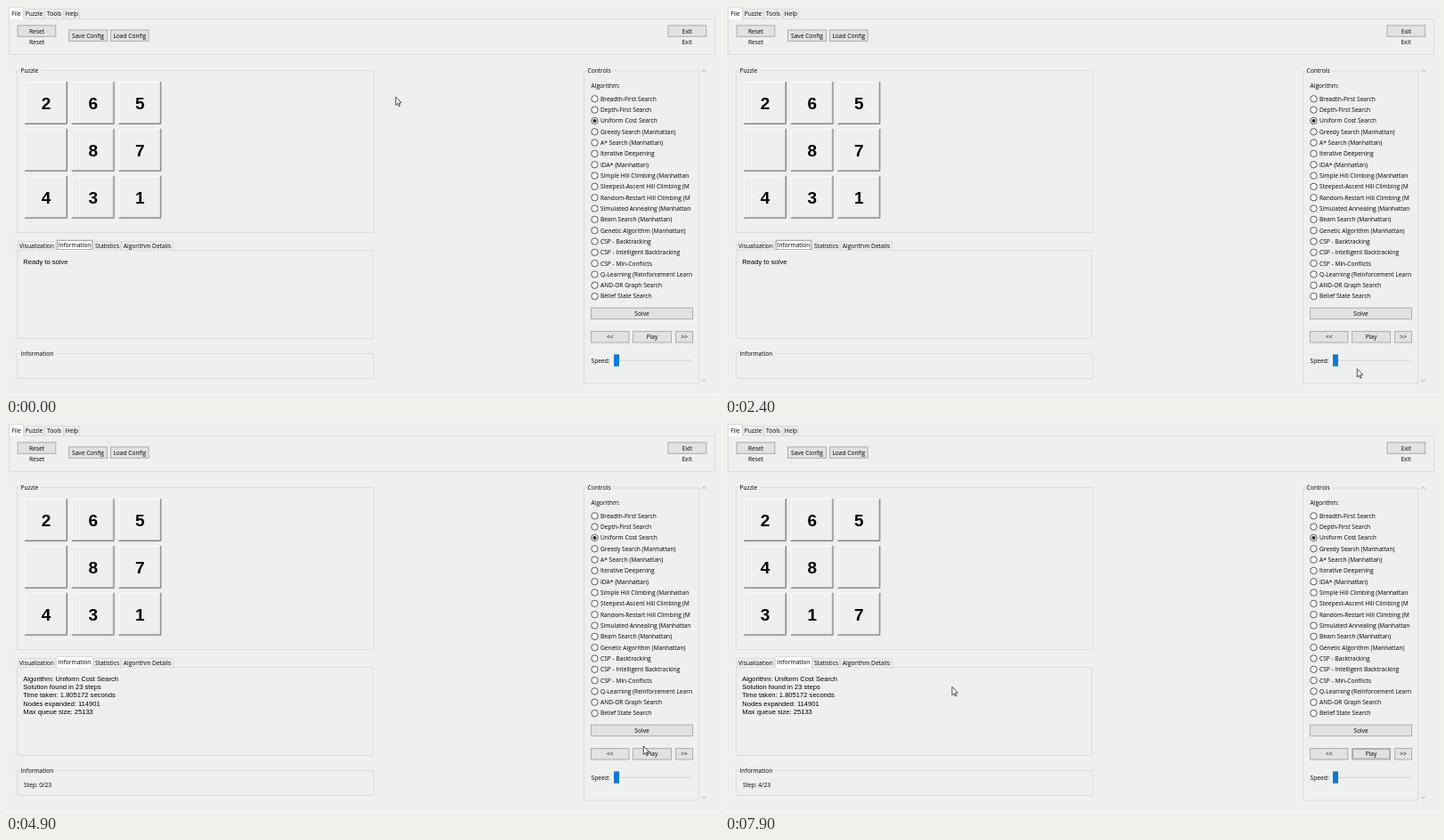
Animation, 800 px wide and 437 px high, one loop 8 s. Source, as an HTML page with a canvas:

```html
<!DOCTYPE html>
<html lang="en">
<head>
<meta charset="utf-8">
<title>Sliding puzzle solver</title>
<style>
html, body { margin: 0; width: 100%; height: 100%; overflow: hidden; background: #edf0ed; }
canvas { display: block; width: 800px; height: 437px; }
</style>
</head>
<body>
<canvas id="stage" width="800" height="437"></canvas>
<script>
const ctx = document.getElementById('stage').getContext('2d');
const LOOP = 8000, TICK = 100;
const BG = '#edf0ed', LINE = '#dadddb', INK = '#000';
const UI = '6.65px "Open Sans", "Noto Sans", sans-serif';
const ARIAL = '7.6px "Liberation Sans", Arial, sans-serif';
const DIGIT = 'bold 19px "Liberation Sans", Arial, sans-serif';

const T = { click: 2900, solved: 4700, ring: 5300, hover: 6900, play: 7200, step: 7300 };
const STEP_MS = 200;
const START = [2, 6, 5, 0, 8, 7, 4, 3, 1];
const BLANK_MOVES = [3, 1, 1, -3];

const ALGORITHMS = [
  'Breadth-First Search', 'Depth-First Search', 'Uniform Cost Search',
  'Greedy Search (Manhattan)', 'A* Search (Manhattan)', 'Iterative Deepening',
  'IDA* (Manhattan)', 'Simple Hill Climbing (Manhattan',
  'Steepest-Ascent Hill Climbing (M', 'Random-Restart Hill Climbing (M',
  'Simulated Annealing (Manhattan', 'Beam Search (Manhattan)',
  'Genetic Algorithm (Manhattan)', 'CSP - Backtracking',
  'CSP - Intelligent Backtracking', 'CSP - Min-Conflicts',
  'Q-Learning (Reinforcement Learn', 'AND-OR Graph Search', 'Belief State Search'
];
const RESULT = [
  'Algorithm: Uniform Cost Search', 'Solution found in 23 steps',
  'Time taken: 1.805172 seconds', 'Nodes expanded: 114901', 'Max queue size: 25133'
];

// Pointer path: time, x, y
const PATH = [
  [0, 437, 102], [800, 443.5, 121], [1300, 478, 165], [1900, 650, 340],
  [2400, 709, 407.5], [2800, 721, 350], [3300, 722, 345.5], [4200, 722, 347],
  [4600, 718, 367], [4900, 715, 363], [5500, 580, 300], [6200, 440, 257.7],
  [6400, 440, 257.7], [6950, 722, 370], [7250, 722, 370], [7900, 254.5, 296.3]
];

function text(s, x, y, align = 'left', font = UI, color = INK) {
  ctx.font = font;
  ctx.textAlign = align;
  ctx.fillStyle = color;
  ctx.fillText(s, x, y);
}

function fill(x, y, w, h, color) {
  ctx.fillStyle = color;
  ctx.fillRect(x, y, w, h);
}

function frame(x, y, w, h, color = LINE, width = 1) {
  ctx.strokeStyle = color;
  ctx.lineWidth = width;
  ctx.strokeRect(x + 0.5, y + 0.5, w - 1, h - 1);
}

function line(points, color, width = 1) {
  ctx.strokeStyle = color;
  ctx.lineWidth = width;
  ctx.beginPath();
  points.forEach(([x, y]) => ctx.lineTo(x, y));
  ctx.stroke();
}

function group(label, x, y, w, h) {
  frame(x, y, w, h);
  ctx.font = UI;
  fill(x + 3, y - 1, ctx.measureText(label).width + 4, 3, BG);
  text(label, x + 4.5, y + 2.5);
}

function button(label, x, y, w, state = '') {
  const h = 13.4, active = state === 'active';
  fill(x, y, w, h, active ? '#cfe6f4' : '#e1e2e1');
  frame(x, y, w, h, active ? '#5486a6' : '#adafad');
  if (active) frame(x + 1, y + 1, w - 2, h - 2, '#8db8d1');
  if (state === 'focus') frame(x + 1, y + 1, w - 2, h - 2, '#a9abaa');
  text(label, x + w / 2, y + h / 2 + 2.4, 'center');
}

function tab(label, x, y, w, h, selected) {
  fill(x, y, w, h, selected ? '#fff' : '#ebedeb');
  line([[x + 0.5, y + h], [x + 0.5, y + 0.5], [x + w - 0.5, y + 0.5], [x + w - 0.5, y + h]], LINE);
  text(label, x + w / 2, y + h / 2 + 2.6, 'center');
}

function toolbar() {
  frame(3, 14, 793, 41);
  tab('Puzzle', 20, 3, 23, 11);
  tab('Tools', 43, 3, 22, 11);
  tab('Help', 65, 3, 18, 11);
  tab('File', 3, 1, 17, 14, true);
  button('Reset', 12.7, 21.4, 43.6);
  text('Reset', 34.5, 43.2, 'center');
  button('Save Config', 70, 26.5, 44);
  button('Load Config', 117, 26.5, 43.6);
  button('Exit', 742.5, 21.4, 43.6);
  text('Exit', 764, 43.2, 'center');
}

function boardAt(step) {
  const cells = START.slice();
  let blank = cells.indexOf(0);
  for (const move of BLANK_MOVES.slice(0, step)) {
    cells[blank] = cells[blank + move];
    blank += move;
    cells[blank] = 0;
  }
  return cells;
}

function board(step) {
  group('Puzzle', 12, 72, 401, 183);
  boardAt(step).forEach((n, i) => {
    const x = 21 + (i % 3) * 52.7;
    const y = 85 + Math.floor(i / 3) * 52.9;
    line([[x + 0.5, y + 47], [x + 0.5, y + 0.5], [x + 47, y + 0.5]], '#fafbfa');
    line([[x + 46.5, y + 1], [x + 46.5, y + 46.5], [x + 1, y + 46.5]], '#c9cbc9');
    line([[x + 47.4, y], [x + 47.4, y + 47.4], [x, y + 47.4]], '#707270');
    if (n) text(n, x + 24, y + 31.3, 'center', DIGIT);
  });
}

function notebook(t) {
  frame(12, 274, 400, 100);
  tab('Visualization', 13, 264, 43, 10);
  tab('Statistics', 98, 264, 31, 10);
  tab('Algorithm Details', 129, 264, 59, 10);
  tab('Information', 56, 262, 42, 13, true);
  if (t < T.click) {
    ctx.setLineDash([1, 1]);
    frame(57, 263, 40, 11, '#555');
    ctx.setLineDash([]);
  }
  const lines = t < T.solved ? ['Ready to solve'] : RESULT;
  lines.forEach((s, i) => text(s, 19.3, 289.6 + i * 9.4, 'left', ARIAL));
}

function status(t, step) {
  group('Information', 12, 390, 401, 29);
  if (t >= T.solved) text('Step: ' + step + '/23', 20, 409.2);
}

function radio(y, on) {
  ctx.beginPath();
  ctx.arc(660.5, y, 3.7, 0, 7);
  ctx.fillStyle = '#fcfdfc';
  ctx.fill();
  ctx.lineWidth = 0.8;
  ctx.strokeStyle = '#333';
  ctx.stroke();
  if (!on) return;
  ctx.beginPath();
  ctx.arc(660.5, y, 2, 0, 7);
  ctx.fillStyle = '#222';
  ctx.fill();
}

function controls(t) {
  group('Controls', 648, 72.5, 130, 352);
  line([[781, 74], [783.3, 71.7], [785.6, 74]], '#a5a7a5');
  line([[781, 419.5], [783.3, 421.8], [785.6, 419.5]], '#a5a7a5');
  text('Algorithm:', 656.5, 92.2);

  ctx.save();
  ctx.beginPath();
  ctx.rect(650, 95, 120, 240);
  ctx.clip();
  ALGORITHMS.forEach((name, i) => {
    const y = 104.3 + i * 12.32;
    radio(y, i === 2);
    text(name, 667, y + 2.4);
  });
  ctx.restore();

  const solve = t >= T.click && t < T.solved ? 'active'
    : t >= T.ring && t < T.play ? 'focus' : '';
  const play = t >= T.hover && t < T.step ? 'active' : t >= T.step ? 'focus' : '';
  button('Solve', 656, 338.7, 115, solve);
  button('<<', 656, 365.1, 43.4);
  button('Play', 703, 365.1, 44, play);
  button('>>', 751, 365.1, 20);

  text('Speed:', 656.5, 400.6);
  fill(682, 397.4, 87, 1.6, '#dadcda');
  fill(682, 391.4, 6, 13.4, '#0f7ad2');
}

function pointer(t) {
  let i = 0;
  while (i < PATH.length - 2 && t > PATH[i + 1][0]) i++;
  const [t0, x0, y0] = PATH[i], [t1, x1, y1] = PATH[i + 1];
  const k = Math.min(1, (t - t0) / (t1 - t0));
  ctx.save();
  ctx.translate(x0 + (x1 - x0) * k + 0.3, y0 + (y1 - y0) * k);
  ctx.beginPath();
  [[0, 0], [0, 9.4], [2.1, 7.5], [3.6, 10.7], [4.9, 10.1], [3.5, 7], [6.3, 6.7]]
    .forEach(([x, y]) => ctx.lineTo(x, y));
  ctx.closePath();
  ctx.fillStyle = '#fff';
  ctx.fill();
  ctx.strokeStyle = '#222';
  ctx.lineWidth = 0.8;
  ctx.stroke();
  ctx.restore();
}

function draw(now) {
  const t = Math.floor((now % LOOP) / TICK) * TICK;
  const step = t < T.step ? 0 : Math.min(4, 1 + Math.floor((t - T.step) / STEP_MS));
  fill(0, 0, 800, 437, BG);
  fill(0, 436, 800, 1, '#fafbfa');
  toolbar();
  board(step);
  notebook(t);
  status(t, step);
  controls(t);
  pointer(t);
}

const begin = performance.now();
function loop() {
  draw(performance.now() - begin);
  requestAnimationFrame(loop);
}
loop();
</script>
</body>
</html>
```
